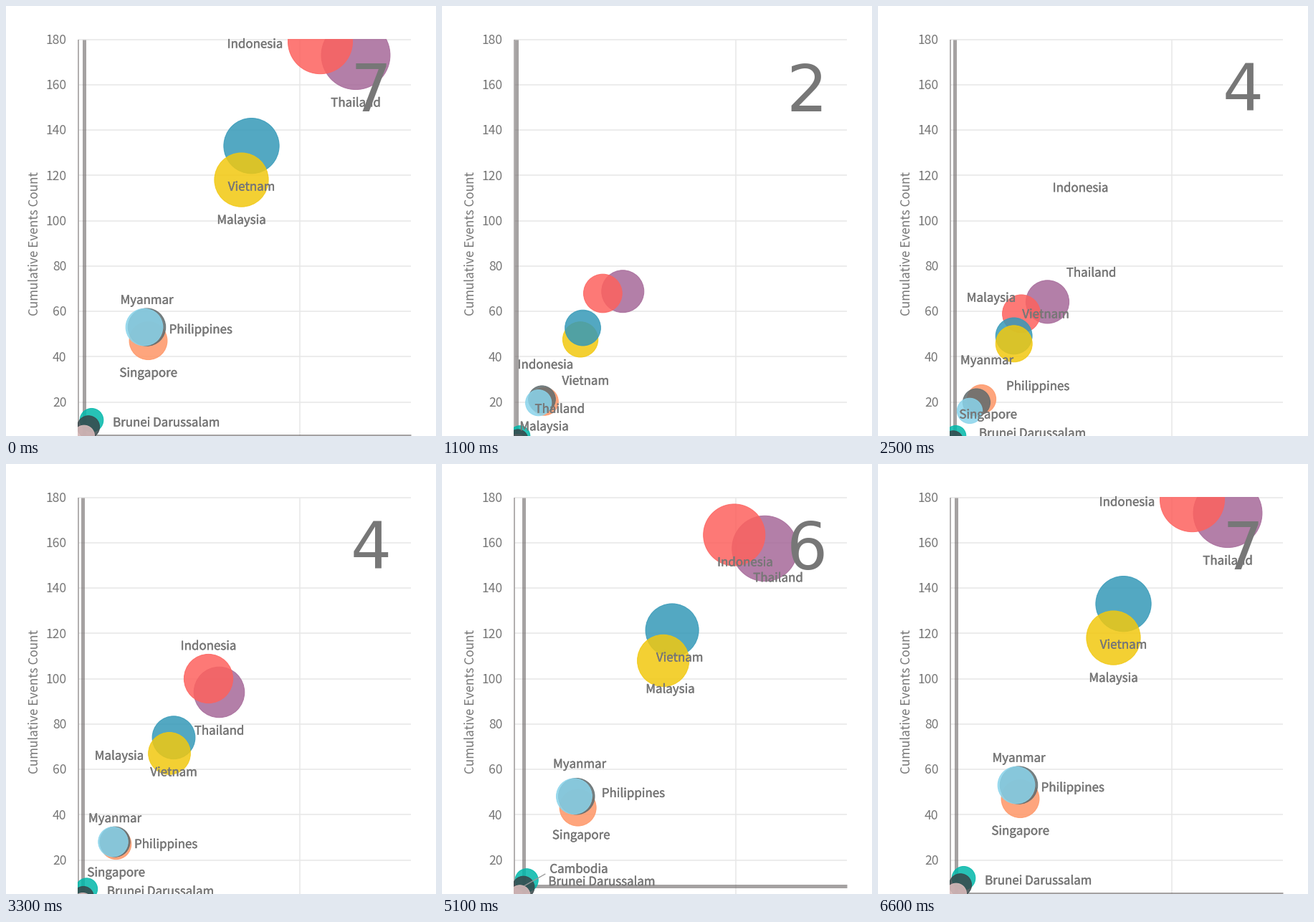
Animation, 600 px wide and 600 px high, one loop 6900 ms. Source, as a matplotlib script:

```python
import numpy as np
import matplotlib.pyplot as plt
from matplotlib import patheffects
from matplotlib.animation import FuncAnimation
from matplotlib.patches import Circle, Rectangle

FRAMES, INTERVAL = 69, 100
PT = 0.72  # points per pixel at 100 dpi
LEFT, RIGHT, TOP = 101, 565, 46.5
UNIT = 3.1625  # pixels per event
GREY = "#777777"

plt.rcParams["font.family"] = ["Noto Sans CJK JP", "DejaVu Sans"]

# colour, label side for years 2 to 7, then (pixels right of the axis, events)
# at three key points; an upper-case side adds a leader line
COUNTRIES = {
    "Thailand": ("#A66999", "bbbbbb", (126.4, 59.7), (196.5, 94), (387, 173)),
    "Indonesia": ("#FD625E", "aaaabl", (86.7, 52.8), (181.5, 100), (337.5, 179)),
    "Vietnam": ("#3599B8", "tbbbbb", (82, 45.4), (133, 74), (241.5, 133)),
    "Malaysia": ("#F2C80F", "bblbbb", (83, 42.5), (127, 67), (227.5, 118)),
    "Singapore": ("#FE9666", " bbabb", (42.2, 20.4), (52.5, 27), (97.5, 47)),
    "Myanmar": ("#5F6B6D", " aabaa", (34.3, 18.6), (51, 28), (95.5, 53)),
    "Philippines": ("#8AD4EB", " rrBrr", (23.8, 14.3), (48.5, 28), (92, 53)),
    "Brunei Darussalam": ("#01B8AA", "  rrrr", (6.8, 4.7), (11.5, 7.2), (18.5, 12)),
    "Cambodia": ("#374649", "    T ", (3.5, 2.8), (7, 3.8), (14, 9)),
    "Laos": ("#DFBFBF", "      ", (5, 0), (6, 1), (8, 5.1)),
}
SIDES = {"a": (0, -1), "b": (0, 1), "l": (-1, 0), "r": (1, 0), "t": (1, -0.7)}
LEADERS = {"B": (0, 35), "T": (30, -17)}

GROWTH = (0.5, 1, 2, 2.43, 2.9, 3)  # place along the key points, per year
STARTS = (5.4, 14.7, 24, 33.2, 43.9, 54.4)  # in frames
HOLDS = (26, 47)
SPEED = 0.13


def text(x, y, s, px, **kw):
    return ax.text(x, y, s, fontsize=px * PT, color=GREY, **kw)


def line(xs, ys, color, px, z, alpha=1):
    ax.plot(xs, ys, color=color, lw=px * PT, zorder=z, alpha=alpha,
            solid_capstyle="butt")


def bubble(name, year):
    """Centre and radius of a country's bubble in a year."""
    reach, events = (np.interp(GROWTH[year - 2], range(4), (0, *keys))
                     for keys in zip(*COUNTRIES[name][2:]))
    return np.array([LEFT + reach, TOP + (180 - events) * UNIT,
                     np.sqrt(5.6 * reach + 180)])


def timing(i):
    """Year on show, the year before it and the progress between them."""
    begun = [t for t in STARTS if t <= i]
    if not begun:
        return 7, 7, 1
    year = len(begun) + 1
    held = sum(begun[-1] < h <= i for h in HOLDS)
    p = SPEED * (i - begun[-1] - held)
    return year, (7 if year == 2 else year - 1), (1 if p > 0.97 else p)


def draw_axes():
    for value in range(20, 181, 20):
        y = TOP + (180 - value) * UNIT
        line((LEFT, RIGHT), (y, y), "#e8e8e8", 1.6, 1)
        text(84.5, y + 6.3, str(value), 17.5, ha="right", va="baseline")
    line((410, 410), (TOP, 600), "#e8e8e8", 1.6, 1)
    line((101.2, 101.2), (TOP, 600), "#aaa6a6", 1.8, 2)
    text(39.7, 331, "Cumulative Events Count", 17.1, rotation=90,
         ha="center", va="center")


def draw_cross(year):
    x, y, _ = bubble("Cambodia" if year == 6 else "Laos", year)
    line((x, x), (TOP, 600), "#777272", 5, 3, 0.66)
    line((LEFT, RIGHT), (y, y), "#777272", 5, 3, 0.66)


def draw_bubbles(year, prev, p):
    clip = Rectangle((100, 46), RIGHT - 100, 560, transform=ax.transData)
    ranked = sorted(COUNTRIES, key=lambda name: -bubble(name, year)[2])
    for z, name in enumerate(ranked):
        x, y, r = (1 - p) * bubble(name, prev) + p * bubble(name, year)
        disc = Circle((x, y), r - 0.5, color=COUNTRIES[name][0], alpha=0.85,
                      lw=PT, zorder=5 + 0.1 * z)
        ax.add_patch(disc)
        disc.set_clip_path(clip)


def draw_label(name, year):
    side = COUNTRIES[name][1][year - 2]
    if side == " ":
        return
    x, y, r = bubble(name, year)
    if side in LEADERS:
        dx, dy = LEADERS[side]
        line((x, x + dx), (y, y + dy), "#999999", 1.3, 8)
        x, y, r = x + dx, y + dy, 0
    ux, uy = SIDES[side.lower()]
    label = text(x + ux * (r + 0.75 * len(name)), y + uy * (r + 14.5) + 8.8,
                 name, 16.9, ha=("center", "left", "right")[ux],
                 va="baseline", zorder=9)
    label.set_path_effects([patheffects.withStroke(linewidth=0.3, foreground=GREY)])


def draw(i):
    ax.clear()
    ax.set_xlim(0, 600)
    ax.set_ylim(600, 0)
    ax.axis("off")
    year, prev, p = timing(i)
    draw_axes()
    draw_cross(year)
    draw_bubbles(year, prev, p)
    for name in COUNTRIES:
        draw_label(name, year)
    text(509, 147, str(year), 90, ha="center", va="baseline", zorder=10,
         family="DejaVu Sans")
    return []


fig = plt.figure(figsize=(6, 6), dpi=100, facecolor="white")
ax = fig.add_axes([0, 0, 1, 1])
anim = FuncAnimation(fig, draw, frames=FRAMES, interval=INTERVAL,
                     init_func=lambda: [], repeat=True, repeat_delay=0)
plt.show()
```
